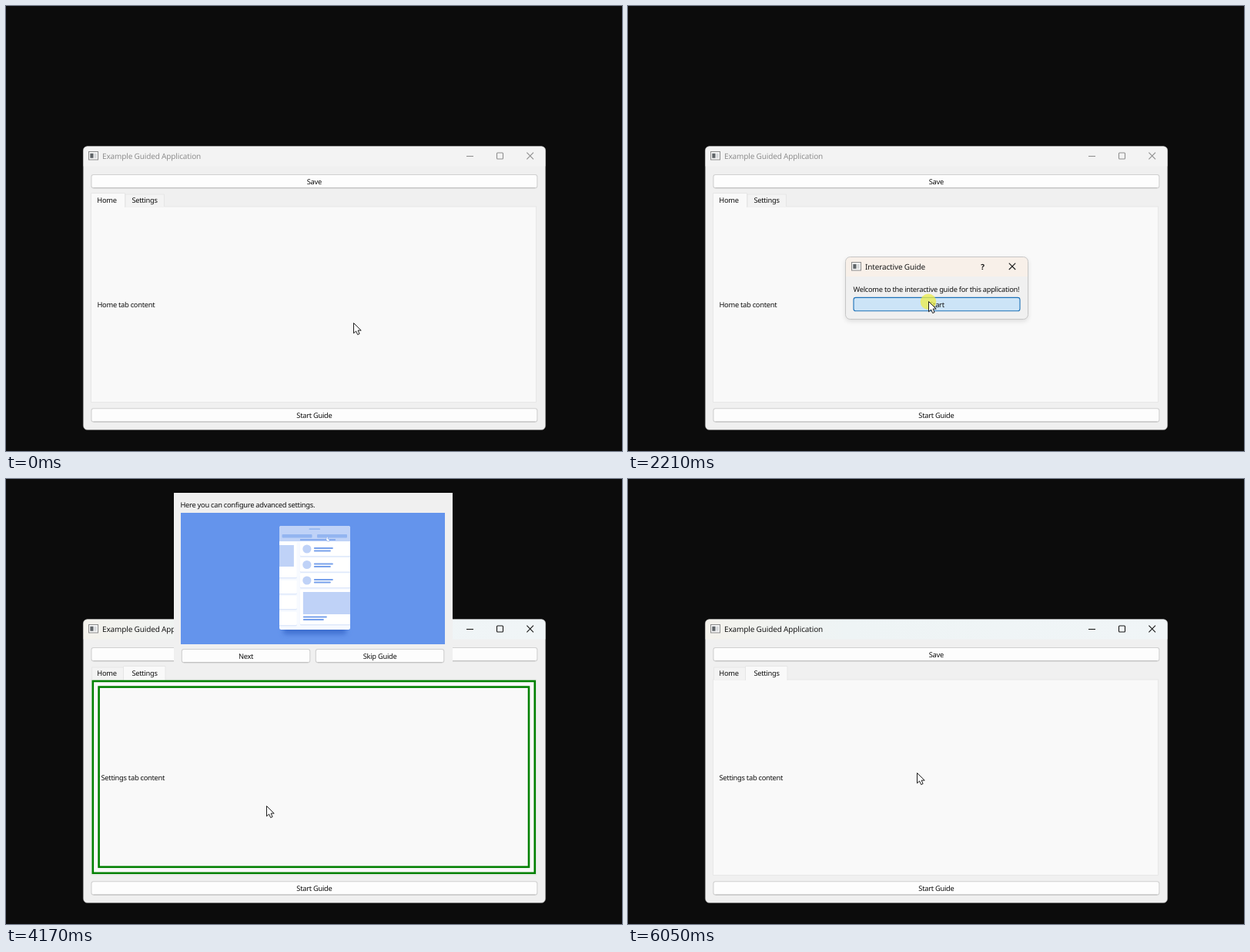
These frames come from a looping animation (800x579 px, 6300 ms). An HTML page:

```html
<!DOCTYPE html>
<html lang="en">
<head>
<meta charset="utf-8">
<title>Guided application</title>
<style>
html, body { margin: 0; width: 100%; height: 100%; overflow: hidden; background: #0c0c0c; }
svg { display: block; width: 100vw; height: 100vh; }
text { text-rendering: geometricPrecision; white-space: pre; }
.ui { font: 9.3px "Noto Sans", "Open Sans", sans-serif; letter-spacing: -.27px; }
.cap { font: 10px "Noto Sans", "Open Sans", sans-serif; letter-spacing: -.15px; }
.fancy { font: bold 10.7px "Liberation Sans", Arial, sans-serif; }
</style>
</head>
<body>
<svg id="stage" viewBox="0 0 800 579" xmlns="http://www.w3.org/2000/svg">
  <defs>
    <linearGradient id="mica">
      <stop offset="0" stop-color="#f4f2ec"/>
      <stop offset=".3" stop-color="#eef4f5"/>
      <stop offset="1" stop-color="#f0f5f7"/>
    </linearGradient>
    <linearGradient id="dusk" x2="0" y2="1">
      <stop offset="0" stop-color="#b9afd2"/>
      <stop offset="1" stop-color="#cf9ad1"/>
    </linearGradient>
    <filter id="soft" x="-20%" y="-20%" width="140%" height="150%"><feGaussianBlur stdDeviation="3"/></filter>
    <clipPath id="phone"><rect x="355" y="61" width="92" height="135" rx="2.5"/></clipPath>
  </defs>
  <g id="scene"></g>
</svg>
<script>
const LOOP = 6300, TICKS = 77;
const GREEN = '#008000';
const scene = document.getElementById('scene');

// Pointer stops: tick, x, y
const STOPS = [
  [0, 451, 412], [2, 440, 395], [3, 440, 395], [8, 379, 530], [11, 380, 533],
  [15, 380, 533], [20, 392, 390], [22, 390, 384], [36, 390, 384], [40, 338, 425],
  [52, 338, 425], [58, 324, 228], [65, 324, 228], [70, 375, 382], [77, 375, 382]
];
const CLICKS = [[13, 14], [27, 28], [42, 43], [59, 60], [71, 72]];

const within = (n, a, b) => n >= a && n <= b;
const ease = p => p * p * (3 - 2 * p);

function pointerAt(n) {
  const i = STOPS.findIndex((s, k) => k > 0 && n <= s[0]);
  const [t0, x0, y0] = STOPS[i - 1], [t1, x1, y1] = STOPS[i];
  const p = ease((n - t0) / (t1 - t0));
  return { x: x0 + (x1 - x0) * p, y: y0 + (y1 - y0) * p };
}

const rect = (x, y, w, h, fill, extra = '') =>
  `<rect x="${x}" y="${y}" width="${w}" height="${h}" fill="${fill}" ${extra}/>`;
const line = (d, color, width = 1) =>
  `<path d="${d}" fill="none" stroke="${color}" stroke-width="${width}"/>`;
const text = (x, y, s, cls = 'ui', fill = '#111', anchor = 'start') =>
  `<text x="${x}" y="${y + 3.4}" class="${cls}" fill="${fill}" text-anchor="${anchor}">${s}</text>`;
const middle = (x, y, s, cls, fill) => text(x, y, s, cls, fill, 'middle');

function button(x, y, w, label, ui = null, focus = false) {
  const h = 17.3;
  const over = ui && ui.x >= x && ui.x <= x + w && ui.y >= y && ui.y <= y + h;
  let fill = '#fdfdfd', edge = focus ? '#0f7bd0' : '#d0d0d0';
  if (over) [fill, edge] = ui.down ? ['#cce4f7', '#1c71b8'] : ['#e0eef9', '#2f8fd8'];
  const base = over || focus ? '' : line(`M${x + 2.5} ${y + h}H${x + w - 2.5}`, '#bcbcbc');
  return rect(x, y, w, h, fill, `rx="2.8" stroke="${edge}" stroke-width="1.1"`) + base +
    middle(x + w / 2, y + 8.9, label);
}

const appIcon = (x, y) =>
  rect(x + .5, y + .5, 12, 10.5, '#f7f7f7', 'stroke="#8c8c8c"') +
  rect(x + 2.3, y + 2.8, 4.2, 6, '#5f6468') + rect(x + 7.6, y + 2.8, 3, 6, '#d5d8da');

const cross = (x, y, r, color) =>
  line(`M${x - r} ${y - r}L${x + r} ${y + r}M${x + r} ${y - r}L${x - r} ${y + r}`, color, 1.1);

function tab(x, w, label, mid, on, dy) {
  const y = (on ? 243.5 : 245) + dy, bottom = (on ? 262 : 261) + dy;
  return rect(x, y, w, bottom - y, on ? '#f9f9f9' : '#f3f3f3') +
    line(`M${x} ${bottom}V${y}H${x + w}V${bottom}`, '#e6e6e6') +
    middle(mid, on ? 252.3 + dy : 253 + dy, label);
}

function mainWindow(n, ui) {
  const tint = within(n, 1, 14) || n === 29 || n >= 44;
  const active = within(n, 1, 14) || n === 29 || within(n, 44, 60) || n >= 74;
  const ink = n === 1 ? '#555' : active ? '#191919' : '#8f8f8f';
  const settings = n >= 44, saveLit = within(n, 30, 43), paneLit = within(n, 45, 60);
  const dy = saveLit ? -4 : 0, top = 261 + dy;

  let s = rect(100.3, 182.5, 600.4, 369, '#f0f0f0', 'rx="5.5"') +
    `<path d="M100.3 208.500V188a5.500 5.500 0 0 1 5.500 -5.500H695.200a5.500 5.500 0 0 1 5.500 5.500V208.500Z" fill="${tint ? 'url(#mica)' : '#f3f3f3'}"/>` +
    rect(100.3, 182.5, 600.4, 369, 'none', 'rx="5.5" stroke="#8a8a8a" stroke-opacity=".6" stroke-width=".8"') +
    appIcon(107, 189) + text(125, 195.6, 'Example Guided Application', 'cap', ink) +
    line('M598 195.500H607', ink, 1.1) +
    rect(637.5, 191, 8, 8, 'none', `rx="1" stroke="${ink}" stroke-width="1.1"`) +
    cross(680.7, 195, 4.3, ink);

  s += saveLit
    ? rect(111.3, 219.3, 578.5, 13.5, '#efefef', `stroke="${GREEN}" stroke-width="2.6"`) + middle(400, 226.5, 'Save')
    : button(110.9, 219.5, 579, 'Save');

  s += rect(110.5, top, 578, 515.5 - top, '#f9f9f9', 'stroke="#e8e8e8"');
  s += settings
    ? tab(111.5, 41, 'Home', 131, false, dy) + tab(152.5, 54.5, 'Settings', 180, true, dy)
    : tab(155, 50.5, 'Settings', 180, false, dy) + tab(110.5, 44, 'Home', 131, true, dy);

  if (paneLit) {
    const lit = `stroke="${GREEN}" stroke-width="2.6"`;
    s += rect(112.8, 263, 574, 249.8, '#f9f9f9', lit) + rect(120.6, 270.6, 558.4, 234.2, '#f9f9f9', lit);
  }
  s += text(paneLit ? 123.5 : 118.5, 388.5 + dy / 2, settings ? 'Settings tab content' : 'Home tab content');
  return s + button(110.9, 523.7, 579, 'Start Guide', n < 15 ? ui : null);
}

function dialog(x, w, title, message, label, bar, ui) {
  const r = x + w;
  return rect(x, 329, w, 81, '#000', 'rx="6" opacity=".12" filter="url(#soft)"') +
    rect(x, 326.5, w, 81, '#f0f0f0', 'rx="6"') +
    `<path d="M${x} 352V332.500a6 6 0 0 1 6 -6H${r - 6}a6 6 0 0 1 6 6V352Z" fill="${bar}"/>` +
    rect(x, 326.5, w, 81, 'none', 'rx="6" stroke="#c2c2c2" stroke-width=".9"') +
    appIcon(x + 7.5, 333) + text(x + 25.5, 339.4, title, 'cap', '#191919') +
    middle(r - 59, 339.2, '<tspan font-weight="600">?</tspan>', 'cap', '#191919') +
    cross(r - 20.5, 338.8, 4.2, '#191919') +
    middle(400.4, 368.3, message) +
    button(x + 10.5, 379.4, w - 21, label, ui, true);
}

function popup(x, y, h, message, art, ui) {
  const by = y + 26 + h + 6.5;
  return rect(x, y, 362, h + 59, '#f0f0f0') + text(x + 8.5, y + 15.6, message) + art +
    button(x + 10.3, by, 166.5, 'Next', ui) + button(x + 184.3, by, 166.5, 'Skip Guide', ui);
}

const fancyArt = () =>
  rect(228, 271, 343, 141, 'url(#dusk)') +
  rect(347.3, 331.3, 104.8, 24.4, '#fff', 'fill-opacity=".12" stroke="#fff" stroke-width="2"') +
  middle(399.7, 343.6, 'FANCY BUTTON', 'fancy', '#fff');

const card = (x, y, h) =>
  rect(x + 2, y + 1.5, 88, h, '#dfe9fb', 'rx="1.5"') + rect(x + 2, y, 88, h, '#fff', 'rx="1.5"');
const strokes = (x, y, a, b) =>
  rect(x, y - .9, a, 1.8, '#78a1eb', 'rx=".9"') + rect(x, y + 2.6, b, 1.8, '#78a1eb', 'rx=".9"');

function phoneArt(n) {
  const p = n < 51 ? 0 : n === 51 ? .73 : n === 52 ? .95 : 1;
  const b = 355 + 92 * (1 - p), a = b - 92;
  const pale = '#bfd2f7', mid = '#93b5f0';
  let s = card(a, 82, 46) + rect(a + 6, 86, 80, 28, pale) + strokes(a + 6, 119, 31, 27);
  for (const y of [132, 152, 173]) s += card(a, y, 17) + strokes(a + 20, y + 7, 25, 22);
  for (const y of [82, 102.5, 123]) {
    s += card(b, y, 18) + `<circle cx="${b + 11}" cy="${y + 9}" r="5.6" fill="${pale}"/>` +
      strokes(b + 20, y + 8, 25, 22);
  }
  s += card(b, 144, 45) + rect(b + 6, 147, 80, 29, pale) + strokes(b + 6, 179.5, 31, 27);

  s += rect(355, 61, 92, 20, pale) + rect(393.5, 64.3, 14.5, 1.8, mid, 'rx=".9"') +
    rect(358.5, 72, 39, 4.6, mid, 'rx="1"') + rect(404, 72, 39, 4.6, mid, 'rx="1"') +
    rect(358 + 45 * p * p, 78.3, 40 + 30 * p * (1 - p), 1.6, '#78a1eb') +
    '<path d="M416.500 75.500q1 -1 1.500 .500v2l2 .600v2.400h-2.800l-1.400 -2.200z" fill="#fff" stroke="#6f99e4" stroke-width=".5"/>';

  return rect(227, 44, 343, 171, '#6494ec') +
    rect(360, 185, 82, 17, '#3f6fd0', 'rx="4" filter="url(#soft)"') +
    `<g clip-path="url(#phone)">${rect(355, 61, 92, 135, '#f7faff')}${s}</g>`;
}

const pointer = ui =>
  (ui.down ? `<circle cx="${ui.x}" cy="${ui.y + .8}" r="10.3" fill="#eeee48" opacity=".75"/>` : '') +
  `<path transform="translate(${ui.x + .5} ${ui.y})" d="M0 .500V13.800L3.100 11L5.200 15.600L7.600 14.500L5.600 10.100H9.700Z" fill="#fff" stroke="#111" stroke-width=".95" stroke-linejoin="round"/>`;

function draw(n) {
  const ui = { ...pointerAt(n), down: CLICKS.some(([a, b]) => within(n, a, b)) };
  let s = mainWindow(n, ui);
  if (within(n, 15, 28))
    s += dialog(282.5, 237, 'Interactive Guide', 'Welcome to the interactive guide for this application!', 'Start', '#f8f0e9', ui);
  if (within(n, 30, 43))
    s += popup(219, 245, 141, 'Click this button to save your work.', fancyArt(), ui);
  if (within(n, 46, 60))
    s += popup(218, 18, 171, 'Here you can configure advanced settings.', phoneArt(n), ui);
  if (within(n, 61, 72))
    s += dialog(295.5, 211, 'Guide Completed', 'You have completed the guide. Enjoy the app!', 'Close', '#f4f2f0', ui);
  scene.innerHTML = s + pointer(ui);
}

let shown = -1;
const start = performance.now();
function frame() {
  const t = (performance.now() - start) % LOOP;
  const n = Math.min(TICKS - 1, Math.floor(t / LOOP * TICKS + .1));
  if (n !== shown) draw(shown = n);
  requestAnimationFrame(frame);
}
frame();
</script>
</body>
</html>
```
